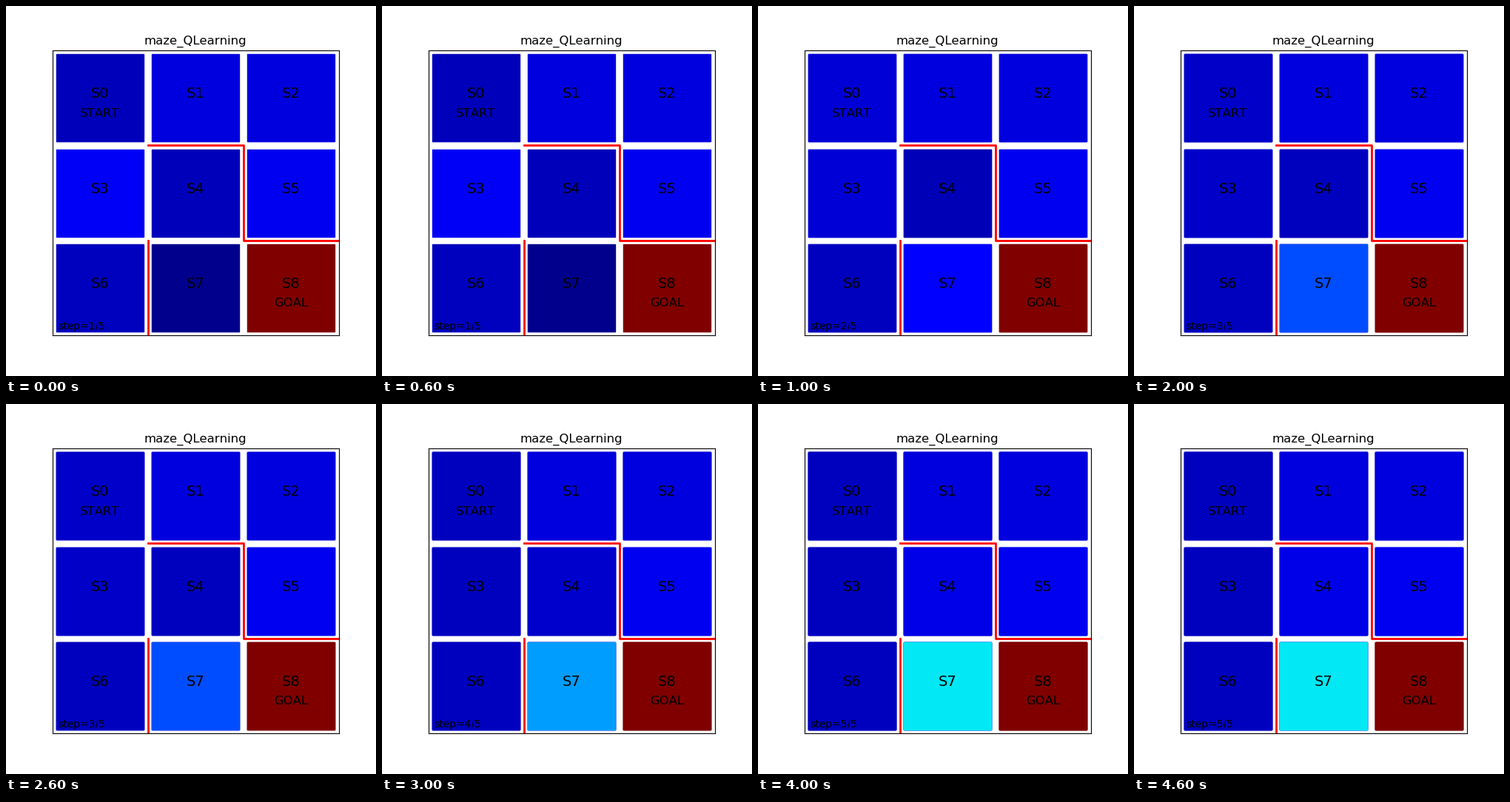
Write a matplotlib script that moves like this. It is 500x500 px and loops after 5 s.

```python
import matplotlib.pyplot as plt
from matplotlib.animation import FuncAnimation

STEPS = 5
SIDE = 3
RATE = 0.1       # learning rate along the path to the goal
FORGET = 0.6     # how fast the dead end S3 loses its early value
LABEL_SIZE = 11.87

START_VALUES = [0.053, 0.084, 0.084, 0.104, 0.053, 0.1, 0.055, 0.0135, 1.0]


def learn(values):
    """Return the state values after one more episode."""
    v = list(values)
    v[4] += RATE * (values[7] - values[4])
    v[7] += RATE * (values[8] - values[7])
    v[3] += FORGET * (values[6] - values[3])
    v[0] = v[3]
    return v


def cell_center(state):
    row, col = divmod(state, SIDE)
    return col + 0.5, SIDE - row - 0.5


plt.rcParams.update({"font.family": "DejaVu Sans", "text.kerning_factor": 6})
fig = plt.figure(figsize=(5, 5), dpi=100)
ax = fig.add_subplot()
ax.set(xlim=(0, SIDE), ylim=(0, SIDE), xticks=[], yticks=[])
ax.set_title("maze_QLearning", size=LABEL_SIZE)

# Walls: one zigzag around S4 and S5, one between S6 and S7
ax.plot([1, 2, 2, 3], [2, 2, 1, 1], color="red", linewidth=2)
ax.plot([1, 1], [0, 1], color="red", linewidth=2)

for state in range(SIDE * SIDE):
    x, y = cell_center(state)
    ax.text(x, y, f"S{state}", size=14, ha="center")
for state, label in ((0, "START"), (8, "GOAL")):
    x, y = cell_center(state)
    ax.text(x, y - 0.2, label, size=LABEL_SIZE, ha="center")
counter = ax.text(0.02, 0.02, "", size=10, transform=ax.transAxes)


def make_layer(values):
    layer = []
    for state, value in enumerate(values):
        x, y = cell_center(state)
        layer += ax.plot([x], [y], marker="s", markersize=85,
                         color=plt.cm.jet(value))
    return layer


layers = []
values = START_VALUES
for _ in range(STEPS):
    layers.append(make_layer(values))
    values = learn(values)


def update(step):
    # Each step paints its squares on top of the earlier ones
    for i, layer in enumerate(layers):
        for square in layer:
            square.set_visible(i <= step)
    counter.set_text(f"step={step + 1}/{STEPS}")
    return [counter]


anim = FuncAnimation(fig, update, frames=STEPS, interval=1000,
                     repeat=True, repeat_delay=0)
plt.show()
```
